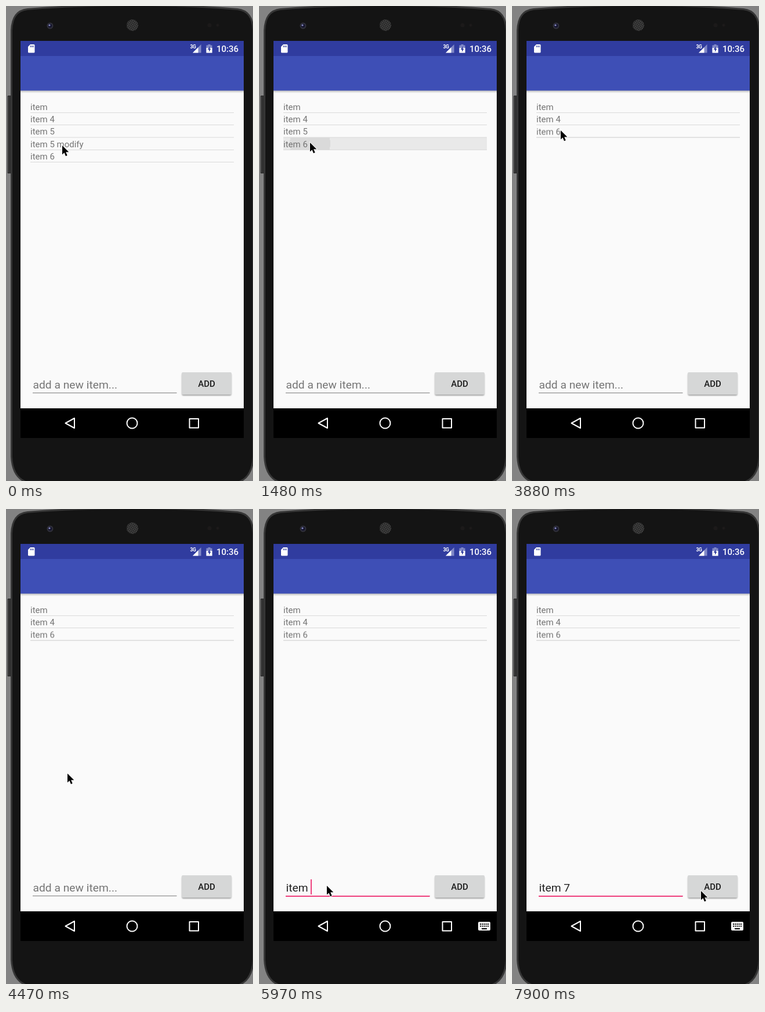
An HTML page for the animation above (8000 ms loop, 426 px wide and 817 px high).

```html
<!DOCTYPE html>
<html lang="en">
<head>
<meta charset="utf-8">
<title>To-do list on a phone</title>
<style>
  html, body { margin: 0; width: 100%; height: 100%; overflow: hidden; background: #838383; }
  svg { display: block; }
  text { font-family: Roboto, sans-serif; white-space: pre; }
  .list text { font-size: 15px; fill: #747474; }
  .list path { stroke: #dadada; }
  .field text { font-size: 19.25px; }
  .icon { fill: none; stroke: #fff; stroke-width: 2; stroke-linejoin: round; }

  .anim { animation: 8s step-end infinite; }
  #mouse { animation-name: mouse; }
  #press { animation-name: press; opacity: 0; }
  #ripple { animation-name: ripple; opacity: 0; transform-origin: 88px 236.5px; }
  #modified { animation-name: drop-modified; }
  #five { animation-name: drop-five; }
  #six { animation-name: move-up; }
  #focus, #keyboard { animation-name: focus; opacity: 0; }
  #hint { animation-name: hint; }
  #typing { animation-name: typing; }
  #caret { animation-name: blink; opacity: 0; }

  @keyframes mouse {
    0% { transform: translate(97px, 240px); }
    3.75% { transform: translate(95px, 239px); }
    5.5% { transform: translate(90px, 236px); }
    7.375% { transform: translate(88px, 235px); }
    29.75% { transform: translate(93px, 228px); }
    31.625% { transform: translate(84px, 214px); }
    50.375% { transform: translate(86px, 236px); }
    52.25% { transform: translate(94px, 326px); }
    54.125% { transform: translate(106px, 455px); }
    56% { transform: translate(114px, 575px); }
    57.75% { transform: translate(117px, 638px); }
    59.625% { transform: translate(117px, 648px); }
    93.125% { transform: translate(135px, 649px); }
    95% { transform: translate(215px, 653px); }
    96.875% { transform: translate(302px, 657px); }
    98.75% { transform: translate(326px, 657px); }
  }
  @keyframes press {
    0% { opacity: 0; transform: none; }
    14.875% { opacity: 1; }
    22.25% { opacity: .5; }
    24.125% { opacity: 0; }
    39.125% { opacity: 1; transform: translateY(-21.3px); }
    48.5% { opacity: 0; }
  }
  @keyframes ripple {
    0% { opacity: 0; transform: scale(0); }
    16.75% { opacity: 1; transform: scale(.5); }
    18.5% { opacity: 1; transform: scale(1); }
    20.375% { opacity: .6; transform: scale(3.5); }
    22.25% { opacity: .3; transform: scale(7); }
    24.125% { opacity: 0; }
  }
  @keyframes drop-modified { 0% { opacity: 1; } 18.5% { opacity: 0; } }
  @keyframes drop-five { 0% { opacity: 1; } 44.75% { opacity: 0; } }
  @keyframes move-up {
    0% { transform: none; }
    18.5% { transform: translateY(-21px); }
    44.75% { transform: translateY(-42.5px); }
  }
  @keyframes focus { 0% { opacity: 0; } 61.5% { opacity: 1; } }
  @keyframes hint { 0% { opacity: 1; } 69% { opacity: 0; } }
  @keyframes typing {
    0% { transform: none; }
    69% { transform: translateX(4.7px); }
    70.875% { transform: translateX(11px); }
    72.75% { transform: translateX(21.2px); }
    74.625% { transform: translateX(43px); }
    87.625% { transform: translateX(54px); }
  }
  @keyframes blink {
    0% { opacity: 0; }
    61.5% { opacity: 1; }
    82% { opacity: 0; }
    87.625% { opacity: 1; }
    95% { opacity: 0; }
  }
</style>
</head>
<body>
<svg width="426" height="817" viewBox="0 0 426 817">
  <defs>
    <pattern id="mesh" width="3" height="3" patternUnits="userSpaceOnUse" patternTransform="rotate(30 218 33)">
      <circle cx="1.5" cy="1.5" r=".95" fill="#5c5c5c"/>
    </pattern>
    <linearGradient id="shade" x2="0" y2="1">
      <stop stop-color="#000" stop-opacity=".26"/>
      <stop offset="1" stop-color="#000" stop-opacity="0"/>
    </linearGradient>
    <clipPath id="row"><path d="M42 226H393V247.500H42Z"/></clipPath>
    <filter id="soft" x="-10%" y="-20%" width="120%" height="150%"><feGaussianBlur stdDeviation="1.2"/></filter>
  </defs>

  <!-- phone body -->
  <path d="M0 0H426V817H0Z" fill="#838383"/>
  <rect x="2.500" y="154" width="7" height="134" rx="1.500" fill="#303030"/>
  <path d="M4 156V286" stroke="#4a4a4a"/>
  <path d="M9.500 42C10.500 19 19 7.500 37 5.500Q120 -1.500 218 -1.500Q316 -1.500 399 5.500C417 7.500 425.500 19 426.500 42V775C425.500 798 417 813 401 819H35C19 813 10.500 798 9.500 775Z"
        fill="#141414" stroke="#363636" stroke-width="3"/>
  <circle cx="76" cy="34" r="5.500" fill="#30303a"/>
  <circle cx="76" cy="34" r="3.300" fill="#15152e"/>
  <circle cx="75" cy="33" r="1.600" fill="#8a8cc4"/>
  <circle cx="218" cy="33" r="10" fill="#202020"/>
  <circle cx="218" cy="33" r="10" fill="url(#mesh)"/>
  <circle cx="351" cy="33" r="3.500" fill="#1c1a1a"/>
  <circle cx="365" cy="33" r="2.500" fill="#1c1a1a"/>

  <!-- screen and bars -->
  <path d="M25 86H410V692H25Z" fill="#fafafa"/>
  <path d="M25 145H410V150H25Z" fill="url(#shade)"/>
  <path d="M25 60H410V86H25Z" fill="#303c9f"/>
  <path d="M25 86H410V145.500H25Z" fill="#3e4fb6"/>
  <path d="M25 692H410V743H25Z" fill="#000"/>

  <!-- status icons -->
  <path d="M42 66H48Q49.500 66 49.500 67.500V79Q49.500 80.500 48 80.500H39.500Q38 80.500 38 79V70Z" fill="#fff"/>
  <path d="M42.500 68V71M44.800 68V71M47 68V71" stroke="#303c9f" stroke-width="1.100"/>
  <path d="M336.500 66V80.500H322Z" fill="#8189c7"/>
  <path d="M331.500 71V80.500H322Z" fill="#fff"/>
  <text x="317.500" y="73" font-size="8.500" font-weight="700" fill="#fff" letter-spacing="-.5">3G</text>
  <path d="M348.500 66H352.500V67.500H355.500V80.500H345.500V67.500H348.500Z" fill="#8189c7"/>
  <path d="M345.500 72H355.500V80.500H345.500Z" fill="#fff"/>
  <path d="M351.500 69L347.800 75H350V79L353.500 73.500H351.500Z" fill="#303c9f"/>
  <text x="363" y="78.500" font-size="15" font-weight="500" fill="#fff">10:36</text>

  <!-- list -->
  <g class="list">
    <g id="press" class="anim">
      <path d="M42 226H393V247.500H42Z" fill="#e9e9e9" style="stroke:none"/>
    </g>
    <g clip-path="url(#row)"><circle id="ripple" class="anim" cx="88" cy="236.500" r="35" fill="#dadada"/></g>
    <text x="42" y="178.500">item</text>
    <path d="M42 183.500H393"/>
    <text x="42" y="200">item 4</text>
    <path d="M42 204.500H393"/>
    <g id="five" class="anim"><text x="42" y="221">item 5</text></g>
    <path d="M42 226H393"/>
    <g id="modified" class="anim"><text x="42" y="242.500">item 5 modify</text><path d="M42 247.500H393"/></g>
    <g id="six" class="anim"><text x="42" y="263.700">item 6</text><path d="M42 268.500H393"/></g>
  </g>

  <!-- input field -->
  <g class="field">
    <text x="46.500" y="658" fill="#212121">item 7</text>
    <g id="typing" class="anim"><path d="M46.500 637H108V664H46.500Z" fill="#fafafa"/></g>
    <text id="hint" class="anim" x="46.500" y="658" fill="#757575">add a new item...</text>
    <path d="M46 665.500H294.500" stroke="#7c7c7c"/>
    <path id="focus" class="anim" d="M46 666H294.500" stroke="#ee3f7c" stroke-width="2"/>
    <g id="caret" class="anim">
      <g id="typing" class="anim"><path d="M47 637V663" stroke="#ee3f7c" stroke-width="2"/></g>
    </g>
  </g>

  <!-- button -->
  <rect x="303.500" y="632" width="85" height="38" rx="2" fill="#000" opacity=".4" filter="url(#soft)"/>
  <rect x="303" y="630" width="86" height="38.500" rx="2" fill="#d6d7d7"/>
  <text x="346" y="655" font-size="15" font-weight="500" fill="#1c1c1c" text-anchor="middle">ADD</text>

  <!-- navigation -->
  <path class="icon" d="M102.500 717.500L118 709V726Z"/>
  <circle class="icon" cx="217.500" cy="717.500" r="9"/>
  <path class="icon" d="M316.500 710H332V725.500H316.500Z"/>
  <g id="keyboard" class="anim">
    <rect x="378" y="710" width="21" height="15" rx="2" fill="#fff"/>
    <path d="M381 714H397M381 717.500H397" stroke="#000" stroke-width="2" stroke-dasharray="2 1.250"/>
    <path d="M384 722H393" stroke="#000" stroke-width="2"/>
  </g>

  <!-- pointer -->
  <path id="mouse" class="anim" d="M0 0V15.500L3.500 12.300L6 18.200L8.700 17L6.200 11.300H11.300Z"
        fill="#000" stroke="#fff" stroke-width="1.600" paint-order="stroke"/>
</svg>
</body>
</html>
```
